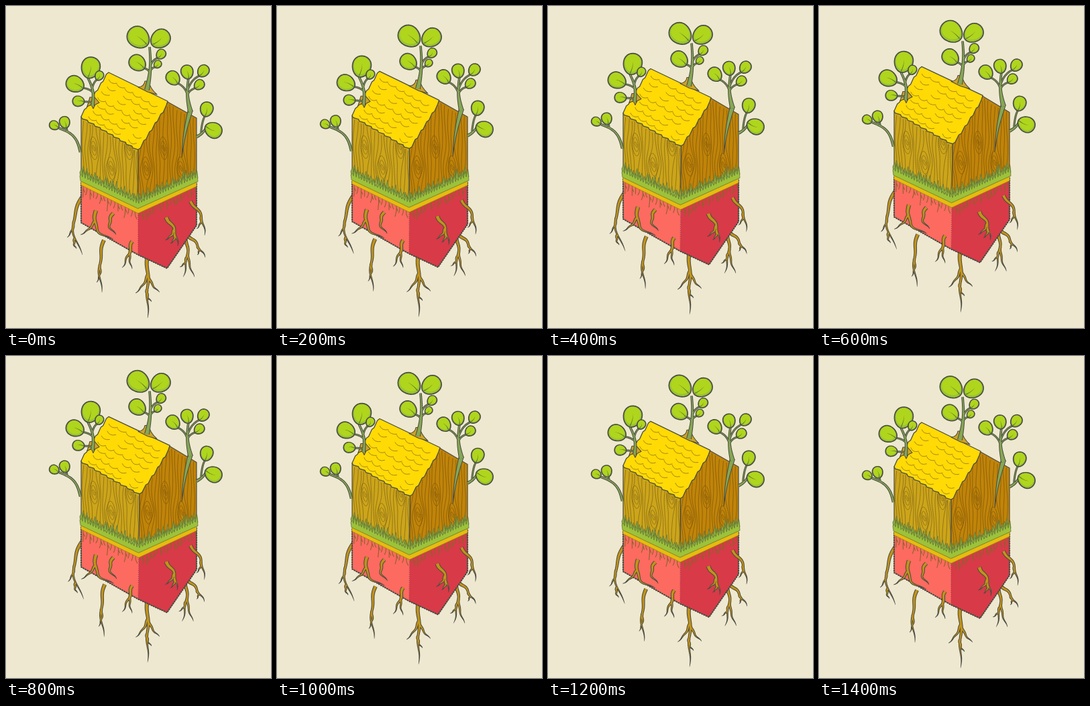
An HTML page for the animation above (1500 ms loop, 395 by 480 pixels).

```html
<!DOCTYPE html>
<html lang="en">
<head>
<meta charset="utf-8">
<title>Floating house</title>
<style>
html, body { margin: 0; width: 100%; height: 100%; overflow: hidden; background: #eee8d0; }
svg { display: block; width: 100vw; height: 100vh; }
path { stroke-linejoin: round; stroke-linecap: round; }
</style>
</head>
<body>
<svg viewBox="0 0 395 480"><g id="art"></g></svg>
<script>
const art = document.getElementById('art');
const INK = '#4b4c43';
const parts = [];

let seed = 11;
const rnd = () => (seed = (seed * 16807) % 2147483647) / 2147483647;
const clamp = (v, a, b) => Math.max(a, Math.min(b, v));
const mix = (a, b, t) => [a[0] + (b[0] - a[0]) * t, a[1] + (b[1] - a[1]) * t];
const pt = (x, y) => x.toFixed(2) + ',' + y.toFixed(2);
const poly = pts => 'M' + pts.map(p => pt(...p)).join('L');
const sample = (n, f) => Array.from({ length: n + 1 }, (_, i) => f(i / n));

// Sideways drift of a point when the house is fully raised
const still = () => 0;
const wall = (x, y) =>
  3.5 * Math.max(0, 1 - Math.abs(x - 218) / 65) * clamp((370 - y) / 156, 0, 1.5);
const sway = (x, y) =>
  (x < 170 ? 3.2 : x > 255 ? -2 : 0) * Math.max(0, (y - 300) / 120);

function add(d, drift, fill, stroke, width = 1, dash = 'none') {
  const el = document.createElementNS('http://www.w3.org/2000/svg', 'path');
  const attrs = { d, fill: fill || 'none', stroke: stroke || 'none', 'stroke-width': width, 'stroke-dasharray': dash };
  for (const k in attrs) el.setAttribute(k, attrs[k]);
  art.appendChild(el);
  if (drift !== still) parts.push({ el, d, drift });
}

// Bowed line from a to b, with an optional wobble
function arc(a, b, bow, wob = 0) {
  const dx = b[0] - a[0], dy = b[1] - a[1], len = Math.hypot(dx, dy);
  return t => {
    const k = (bow * Math.sin(Math.PI * t) + wob * Math.sin(4 * Math.PI * t)) / len;
    return [a[0] + dx * t - dy * k, a[1] + dy * t + dx * k];
  };
}

function ribbon(curve, width) {
  const side = s => sample(20, t => {
    const p = curve(t), a = curve(t - 0.01), b = curve(t + 0.01);
    const dx = b[0] - a[0], dy = b[1] - a[1], k = s * width(t) / 2 / Math.hypot(dx, dy);
    return [p[0] - dy * k, p[1] + dx * k];
  });
  return poly(side(1).concat(side(-1).reverse())) + 'Z';
}

// Limbs are [curve, width]; one outline is shared by all of them
function limbs(list, drift, fill) {
  const draw = (inset, color) => add(list.map(([c, w]) =>
    ribbon(c, t => Math.max(0, w(t) - inset))).join(''), drift, color);
  draw(0, INK);
  draw(2.1, fill);
}

// forks: [tip x, tip y, place on the root]
function root(x0, y0, x1, y1, bow, forks = [], w = 5.6) {
  const main = arc([x0, y0], [x1, y1], bow, 1.3);
  const thin = k => t => w * k * (1 - t) ** 0.7 + 0.4;
  limbs([[main, thin(1)], ...forks.map(([x, y, at]) =>
    [arc(main(at), [x, y], x < main(at)[0] ? -2.5 : 2.5, 0.6), thin(0.75)])], sway, '#c39318');
}

// Egg-shaped leaf pointing back at its joint
function leaf(x, y, r, from) {
  const a = Math.atan2(y - from[1], x - from[0]), c = Math.cos(a), s = Math.sin(a);
  const egg = (k, dy) => poly(sample(30, t => {
    const q = t * 2 * Math.PI, u = 1.1 * r * k * Math.cos(q);
    const v = 0.95 * r * k * Math.sin(q) * (1 + 0.12 * Math.cos(q));
    return [x + u * c - v * s, y + dy + u * s + v * c];
  })) + 'Z';
  add(egg(1, 0), still, '#98c332', INK, 1.7);
  add(egg(0.83, -r * 0.1), still, '#b0d51d');
  const vein = arc([x - r * c, y - r * s], [x + r * 0.3 * c, y + r * 0.3 * s], 1);
  add(ribbon(vein, t => 1.5 * (1 - t)), still, '#62802f');
}

// leaves: [center x, center y, radius, joint on the stem]
function plant(x0, y0, x1, y1, bow, w, leaves) {
  const main = arc([x0, y0], [x1, y1], bow);
  const stalks = leaves.map(([x, y, r, at]) => {
    const a = main(at), b = mix([x, y], a, Math.min(1, r / Math.hypot(x - a[0], y - a[1])));
    const mid = [a[0] + (b[0] - a[0]) * 0.25, a[1] + (b[1] - a[1]) * 0.75];
    return [t => mix(mix(a, mid, t), mix(mid, b, t), t), () => 3];
  }).filter((_, i) => leaves[i][3] < 1);
  limbs([[main, t => 3.6 + (w - 3.6) * (1 - t) ** 2], ...stalks], still, '#86a753');
  for (const [x, y, r, at] of leaves) leaf(x, y, r, main(at));
}

const soil = x => x < 197 ? 260 + (x - 112) * 0.48 : 300.8 - (x - 197) * 0.45;
const eave = x => x < 197 ? 165 + (x - 112) * 0.577
  : x < 241 ? 214 - (x - 197) * 1.6 : 143 + (x - 241) * 0.55;

function grain() {
  const knots = sample(5, t => [131 + t * 130, 212 + 30 * (Math.round(t * 5) % 2)]);
  const tone = x => x < 197 ? '#866a18' : '#82580b';
  for (let u = 115; u < 283; u += 5) {
    const lo = u < 197 ? 113 : 198, hi = u < 197 ? 196 : 283, pts = [];
    for (let y = eave(u) + 2; y < soil(u) - 8; y += 3) {
      let x = u + Math.sin(y / 13 + u) * 1.1;
      for (const [kx, ky] of knots) {
        const o = u - kx;
        x += Math.sign(o) * 7 * Math.exp(-Math.abs(o) / 7 - ((y - ky) / 18) ** 2);
      }
      x = clamp(x, lo, hi);
      if (y > eave(x) + 2) pts.push([x, y]);
    }
    if (pts.length > 2) add(poly(pts), wall, '', tone(u), 0.8);
  }
  for (const [x, y] of knots) {
    for (const k of [1, 0.62, 0.25]) {
      add(poly(sample(24, t => {
        const q = t * 2 * Math.PI;
        return [x + 5.5 * k * Math.cos(q) + 1.5 * Math.sin(q), y + 17 * k * Math.sin(q)];
      })), wall, '', tone(x), 0.8);
    }
  }
}

function roof() {
  const top = [153, 99], apex = [239, 148], front = [197, 214], back = [112, 165];
  const ragged = (a, b, n, dx, dy) => sample(n * 2, t => {
    const k = Math.round(t * n * 2) % 2, p = mix(a, b, t + k * 0.25 / n);
    return [p[0] + dx * k, p[1] + dy * k];
  });
  add(poly([top, [241, 142], ...ragged(apex, front, 5, 1.4, 1),
    ...ragged(front, back, 9, -0.8, 1.8), ...ragged(back, top, 5, -1.4, -0.6)]) + 'Z',
    wall, '#ffda05', INK, 1.3);

  // Rows of shingles, each a chain of sagging arcs
  let d = '';
  for (let v = 0.12; v < 0.95; v += 0.135) {
    const a = mix(top, back, v), b = mix(apex, front, v);
    for (let u = 0.06 + rnd() * 0.1; u < 0.82; u += 0.14) {
      const p = mix(a, b, u), q = mix(a, b, u + 0.14), sag = 3 + rnd() * 3;
      if (rnd() > 0.1) d += `M${pt(...p)}Q${pt(p[0] + 3, p[1] + 3 + sag)} ${pt(q[0], q[1] - 1.5)}`;
    }
  }
  add(d, wall, '', '#9c7d15', 0.9);
}

function blades(drop, high, fill) {
  const tops = [];
  for (let x = 110; x < 285; x += 4) {
    tops.push([x, soil(x) + drop - 7]);
    tops.push([x + 1 + rnd() * 2, soil(x + 2) + drop - 10 - rnd() * high]);
  }
  const foot = x => [x, soil(x) + drop];
  add(poly([foot(111), ...tops, foot(286), foot(197)]) + 'Z', wall, fill, '#62753a', 0.8);
}

function block() {
  add('M112,165L197,214L197,300L112,259Z', wall, '#cca51a', INK, 1.2);
  add('M197,214L241,143L284,167L284,262L197,300Z', wall, '#c08409', INK, 1.2);
  grain();
  roof();

  add('M112,262L197,303L197,371L112,323Z', wall, '#fd6a60');
  add('M197,303L284,264L284,327L240,391L197,371Z', wall, '#d83a48');
  const hem = 'M112,264L112,323L197,371L240,391L284,327L284,264';
  add(hem, wall, '', INK, 1);
  add(hem, wall, '', INK, 2.4, '0.1 3.4');
  add('M197,306L197,371', wall, '', '#a03c44', 1.3, '0.1 3');

  let d = '';
  for (let x = 115; x < 282; x += 5.2) {
    const y = soil(x) + 6, len = 6 + rnd() * 15, k = rnd() * 4 - 2;
    d += `M${pt(x, y)}Q${pt(x + k, y + len / 2)} ${pt(x - k, y + len)}`;
    if (len > 13) d += `M${pt(x + k * 0.4, y + 5)}L${pt(x + 2.4, y + 10)}`;
  }
  add(d, wall, '', '#8d622a', 1.1);
  add('M112,255L197,296L284,257L284,269L197,309L112,267Z', wall, '#e6bc0e', '#98801f', 0.7);
  blades(-4, 11, '#8cab3c');
  blades(1, 9, '#9dc23a');
}

// behind the block
root(114, 284, 114, 371, 14, [[91, 345, 0.42], [105, 362, 0.72]]);
root(211, 372, 211, 465, 0, [[193, 428, 0.3], [229, 427, 0.32], [217, 441, 0.55]], 6.2);
root(268, 340, 264, 404, -4, [[281, 404, 0.42], [259, 389, 0.55]]);
root(270, 340, 297, 375, -2, [[285, 371, 0.55]]);

block();

// growing out of the faces
root(146, 349, 143, 427, 5, [[135, 412, 0.48]]);
root(134, 305, 160, 348, 13, [[111, 341, 0.25]], 6);
root(160, 309, 164, 341, 8);
root(188, 351, 173, 390, -2, [[188, 392, 0.3]]);
root(239, 315, 256, 358, -4, [[237, 349, 0.45], [245, 354, 0.6]], 6.5);
root(275, 291, 296, 342, -6, [[284, 332, 0.5]]);

// ridge, left slope, gable, right wall, left wall
add('M207,112Q206,120 197,121L211,128L225,132Q214,122 213,112Z', still, '#cda326', INK, 1.1);
plant(210, 125, 214, 61, 3, 8, [[197.5, 47, 16, 1], [230, 49, 14, 1],
  [196, 85, 12, 0.4], [231, 72, 7, 0.55], [226, 87, 5.5, 0.42]]);

add('M125,136L121,150L127,147L130,153L133,147L139,144L132,136Z', still, '#cda326', INK, 1.1);
plant(129, 149, 122, 107, 4, 6, [[126, 92, 14.5, 1], [103, 116.5, 12.5, 0.45],
  [108, 142, 8, 0.12], [139, 104, 6.5, 0.6]]);

limbs([[arc([262, 226], [275, 155], -2), t => 1 + 7 * t]], still, '#86a753');
plant(275, 158, 272, 107, -3, 8, [[270, 98.5, 9.5, 1], [249, 107.5, 10.2, 0.5],
  [294, 97, 8.6, 0.6], [288, 117.5, 7.4, 0.5]]);

plant(284, 195, 299, 180, 2, 5, [[309, 185, 12, 1], [299, 154, 10, 0.35]]);
plant(111, 218, 79, 182, 8, 4.5, [[72, 178, 6.8, 1], [87.5, 173.5, 8, 0.75]]);

let shown = -1;
function frame(now) {
  const step = Math.floor((now % 1500) / 100);
  if (step !== shown) {
    shown = step;
    const rise = (1 - Math.cos(step * Math.PI / 7)) / 2;
    art.setAttribute('transform', `translate(0 ${(-9 * rise).toFixed(2)})`);
    for (const { el, d, drift } of parts) {
      el.setAttribute('d', d.replace(/(-?[\d.]+),(-?[\d.]+)/g,
        (_, x, y) => pt(+x + rise * drift(+x, +y), +y)));
    }
  }
  requestAnimationFrame(frame);
}
frame(performance.now());
</script>
</body>
</html>
```
